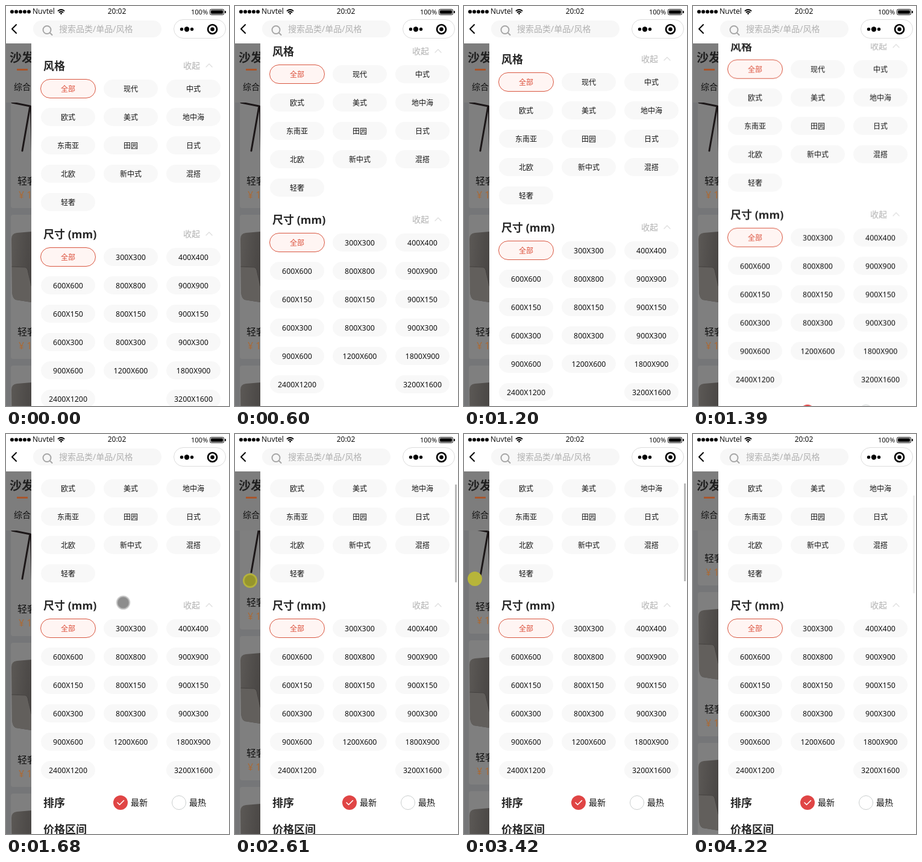
An HTML page that plays this animation: 370x663 px, repeating every 5220 ms.

```html
<!DOCTYPE html>
<html lang="zh">
<head>
<meta charset="utf-8">
<title>筛选</title>
<style>
  html, body { margin: 0; width: 100%; height: 100%; overflow: hidden; background: #fff; }
  svg { display: block; width: 100%; height: 100%; }
  text { font-family: "Noto Sans", "Noto Sans CJK SC", "Noto Sans CJK", sans-serif; font-size: 14px; fill: #111; }
  .pill { fill: #f8f8f8; }
  .label { font-size: 12px; text-anchor: middle; }
  .size { font-size: 12.4px; }
  .on.pill { fill: #fff5f3; stroke: #d8553f; }
  .on.label { fill: #dc4f3a; }
  .head { font-size: 18px; font-weight: 700; fill: #262626; }
  .title { font-size: 20px; font-weight: 700; fill: #202020; }
  .name { font-size: 16px; }
  .price { font-size: 16px; fill: #aa6a35; }
  .status { font-size: 12px; }
  .battery { font-size: 11px; }
  .hint { fill: #b0b0b0; }
  .line { fill: none; stroke-linecap: round; stroke-linejoin: round; }
</style>
</head>
<body>
<svg viewBox="0 0 370 663">
  <defs>
    <clipPath id="panelClip"><rect x="42" y="62" width="328" height="601"/></clipPath>
    <clipPath id="pageClip"><rect y="62" width="42" height="601"/></clipPath>
    <clipPath id="listClip"><rect y="160" width="42" height="503"/></clipPath>
    <linearGradient id="fabric" x2="1" y2=".3">
      <stop stop-color="#5c5956"/><stop offset="1" stop-color="#4a4745"/>
    </linearGradient>
    <g id="chair">
      <path fill="url(#fabric)" d="M9 40Q9 31 18 30L42 28V145L16 141Q11 139 10 128Z"/>
      <path fill="#625f5c" d="M10 86L32 87Q36 88 37 96L42 118V145L16 141Q11 139 10 128Z"/>
      <path class="line" stroke="#454240" d="M10 86L32 87Q36 88 37 96L42 118"/>
    </g>
  </defs>

  <rect width="370" height="663" fill="#fff"/>

  <g clip-path="url(#pageClip)">
    <rect y="62" width="42" height="601" fill="#757678"/>
    <g clip-path="url(#listClip)"><g id="list"></g></g>
    <rect y="62" width="42" height="98" fill="#7d7d7d"/>
    <text class="title" x="6" y="93">沙发</text>
    <rect x="18" y="104" width="18" height="3" fill="#a9552b"/>
    <text x="13" y="139">综合</text>
  </g>

  <g clip-path="url(#panelClip)">
    <rect x="42" y="62" width="328" height="601" fill="#fff"/>
    <g id="panel"></g>
  </g>

  <g id="touch" opacity="0">
    <circle r="10.500" fill="#8d8d8d" stroke="#c2c2c2" stroke-width="2"/>
  </g>
  <g id="cursor" opacity="0">
    <circle r="12" fill="#b7b53a"/>
    <circle id="press" r="9.500" fill="#96952c" stroke="#a9a83a"/>
  </g>
  <rect id="thumb" x="365" y="81" width="3" height="162" fill="#b9b9b9" opacity="0"/>

  <g id="signal"></g>
  <text class="status" x="44" y="13">Nuvtel</text>
  <g class="line" stroke="#000" stroke-width="1.800">
    <path d="M86.500 8Q91.500 4 96.500 8M88.500 10.500Q91.500 8 94.500 10.500"/>
    <circle cx="91.500" cy="12.500" r=".6"/>
  </g>
  <text class="status" x="184" y="13" text-anchor="middle">20:02</text>
  <text class="battery" x="307" y="14">100%</text>
  <rect x="338.500" y="5.500" width="23" height="9" rx="2" fill="none" stroke="#000"/>
  <rect x="340" y="7" width="20" height="6" rx="1"/>
  <rect x="363" y="8" width="2" height="4" rx="1"/>

  <path class="line" stroke="#000" stroke-width="2" d="M17 31L10 38L17 45"/>
  <rect x="45" y="24" width="213" height="28" rx="14" fill="#f7f7f7"/>
  <g class="line" stroke="#a6a6a6" stroke-width="2">
    <circle cx="68" cy="39.500" r="6.500"/><path d="M73 44.500L76.500 48"/>
  </g>
  <text class="hint" x="88" y="43">搜索品类/单品/风格</text>
  <rect x="278.500" y="22.500" width="86" height="31" rx="15.500" fill="#fff" stroke="#dcdcdc"/>
  <circle cx="291.500" cy="38.500" r="2.700"/>
  <circle cx="300" cy="38.500" r="4.200"/>
  <circle cx="308.500" cy="38.500" r="2.700"/>
  <circle cx="342.500" cy="38.500" r="7.500" fill="none" stroke="#000" stroke-width="2.700"/>
  <circle cx="342.500" cy="38.500" r="3.300"/>
</svg>
<script>
const LOOP = 5220;
const el = id => document.getElementById(id);

el('signal').innerHTML = [10, 17, 24, 31, 38].map(x => `<circle cx="${x}" cy="9.500" r="3"/>`).join('');

// Product list behind the drawer
const caption = y => `<text class="name" x="19" y="${y}">轻奢</text>
  <text class="price" x="21" y="${y + 23}">¥ 1</text>`;
const card = y => `<rect x="8" y="${y}" width="60" height="239" rx="4" fill="#7f7f7f"/>`;

el('list').innerHTML = card(96) + `
  <path class="line" stroke="#1c1718" stroke-width="3" d="M10 160L40 166L27 240"/>
  <path class="line" stroke="#1c1718" stroke-width="2" d="M41 166L43 243"/>` + caption(296) +
  [346, 596].map(y => card(y) + `<use href="#chair" y="${y}"/>` + caption(y + 200)).join('');

// Filter drawer
const heading = (text, y) => `<text class="head" x="62" y="${y + 7}">${text}</text>`;
const fold = y => `<text class="hint" x="294" y="${y + 5}">收起</text>
  <path class="line" stroke="#dedede" stroke-width="1.300" d="M332 ${y + 2}L337 ${y - 3}L342 ${y + 2}"/>`;

function pill(text, i, top) {
  if (!text) return '';
  const x = 58 + i % 3 * 104, y = top + Math.floor(i / 3) * 47;
  const on = i ? '' : ' on', grow = i ? 0 : .5;
  const size = /\d/.test(text) ? ' size' : '';
  return `<rect class="pill${on}" x="${x - grow}" y="${y - grow}" width="${90 + 2 * grow}" height="${30 + 2 * grow}" rx="15.500"/>
    <text class="label${on}${size}" x="${x + 45}" y="${y + 20}">${text}</text>`;
}
const pills = (names, top) => names.split(',').map((name, i) => pill(name, i, top)).join('');

el('panel').innerHTML =
  heading('风格', 99) + fold(99) +
  pills('全部,现代,中式,欧式,美式,地中海,东南亚,田园,日式,北欧,新中式,混搭,轻奢', 122) +
  heading('尺寸 (mm)', 378) + fold(378) +
  pills('全部,300X300,400X400,600X600,800X800,900X900,600X150,800X150,900X150,' +
    '600X300,800X300,900X300,900X600,1200X600,1800X900,2400X1200,,3200X1600', 401) +
  heading('排序', 705) + `
  <circle cx="190" cy="705" r="12" fill="#e04545"/>
  <path class="line" stroke="#fff" stroke-width="1.600" d="M185 705L188.500 708.500L195.500 701.500"/>
  <text x="207" y="710">最新</text>
  <circle cx="287" cy="705" r="11.500" fill="#fff" stroke="#c9cdcd"/>
  <text x="304" y="710">最热</text>` +
  heading('价格区间', 749);

// Each key is [time, value, steps until the next key]
function track(id, prop, keys, format = v => v) {
  const last = keys[keys.length - 1];
  const frames = [...keys, [LOOP, last[1], 1]].map(([time, value, steps = 1]) => ({
    offset: time / LOOP,
    [prop]: format(value),
    easing: `steps(${steps}, end)`
  }));
  el(id).animate(frames, { duration: LOOP, iterations: Infinity });
}
const up = v => `translate(0px, ${-v}px)`;

const panelScroll = [[0, 0], [140, 3, 5], [600, 24], [670, 40, 2], [810, 66, 2], [950, 45, 4],
  [1200, 11], [1260, 20, 6], [1680, 94]];
const listScroll = [[0, 0], [2140, 14, 3], [2350, 60, 3], [2610, 11], [2680, 24, 3], [2881, 120, 4],
  [3150, 45], [3210, 32, 3], [3420, 4], [3500, 20, 3], [3680, 84]];
const cursorPath = [[0, [18, 240]], [2140, [14, 240], 3], [2350, [20, 194], 3], [2610, [25, 243]],
  [2680, [24, 226], 3], [2881, [16, 120], 4], [3150, [15, 205]], [3210, [16, 218], 3],
  [3420, [18, 240]], [3500, [17, 228], 3], [3680, [15, 165]]];

track('panel', 'transform', panelScroll, up);
track('list', 'transform', listScroll, up);
track('thumb', 'transform', listScroll, v => up(-v / 4));
track('thumb', 'opacity', [[0, 0], [2140, 1], [4080, .6], [4220, .25]]);
track('cursor', 'transform', cursorPath, ([x, y]) => `translate(${x}px, ${y}px)`);
track('cursor', 'opacity', [[0, 0], [2140, 1], [3680, 0]]);
track('press', 'opacity', [[0, 1], [3420, 0], [3500, 1]]);
track('touch', 'transform', [[0, 291], [1680, 279.5]], y => `translate(194.5px, ${y}px)`);
track('touch', 'opacity', [[0, 0], [1610, 1], [1800, .5], [1870, 0]]);
</script>
</body>
</html>
```
